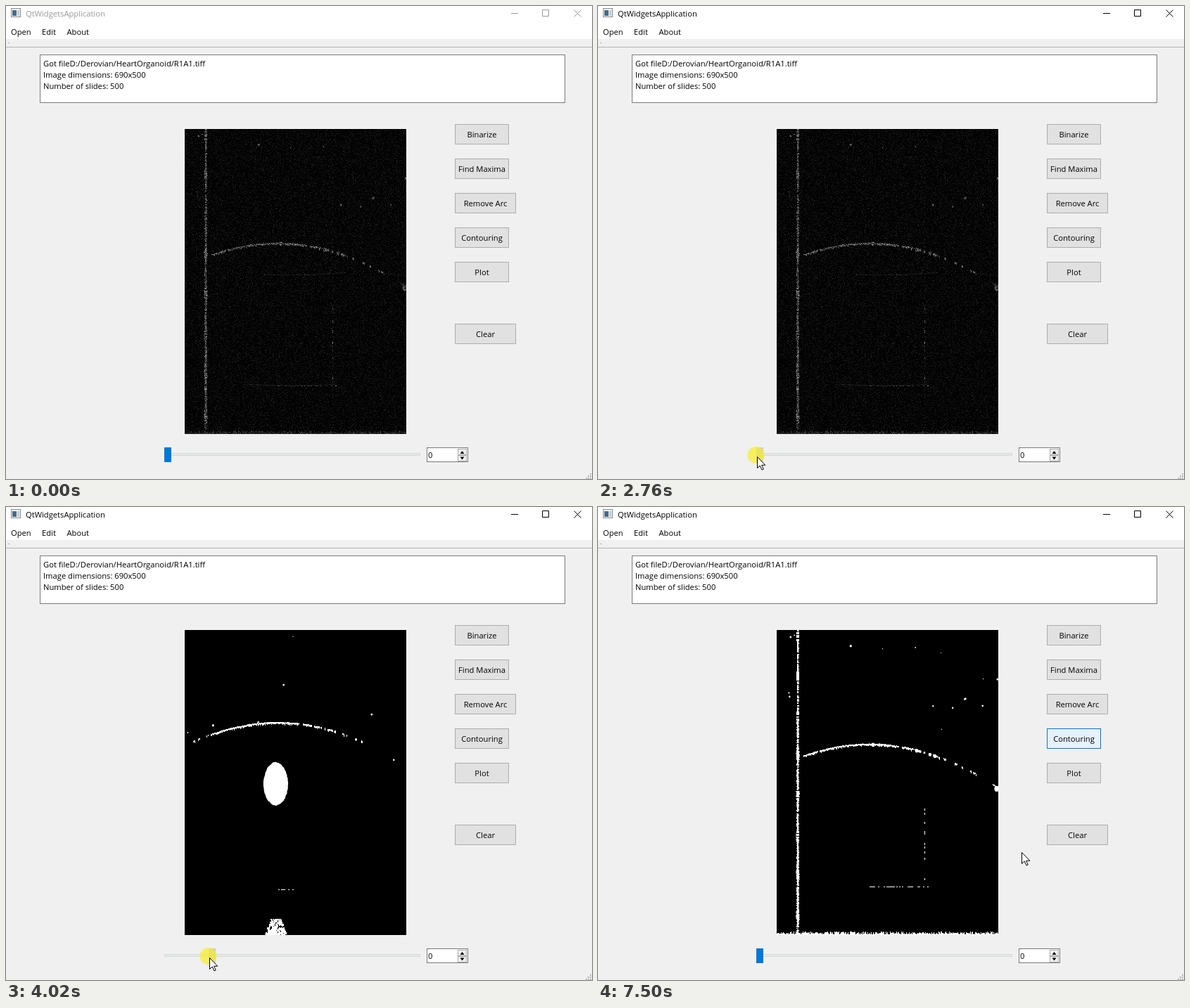
An HTML page with a canvas for the animation above (8000 ms loop, 833x673 px).

```html
<!DOCTYPE html>
<html lang="en">
<head>
<meta charset="utf-8">
<title>QtWidgetsApplication</title>
<style>
  html, body { margin: 0; width: 100%; height: 100%; overflow: hidden; background: #f0f0f0; }
  svg, canvas { position: absolute; left: 0; top: 0; }
  canvas { left: 254px; top: 175px; }
  text { font: 11.2px "Open Sans", "Noto Sans", sans-serif; white-space: pre; }
  rect { shape-rendering: crispEdges; }
  .button rect { fill: #e1e1e1; stroke: #adadad; }
  .button.hot rect { fill: #e5f1fb; stroke: #0078d7; }
  .button text { text-anchor: middle; }
</style>
</head>
<body>
<svg id="ui" width="833" height="673">
  <rect width="833" height="47" fill="#fff"/>
  <rect y="58" width="833" height="1" fill="#b4b4b4"/>
  <rect x="3" y="52" width="2" height="1" fill="#a0a0a0"/>
  <rect x="7.5" y="3.5" width="13" height="12" fill="#f4f4f4" stroke="#858b90"/>
  <rect x="9" y="6" width="6" height="8" fill="#456c8c"/>
  <rect x="16" y="6" width="3" height="8" fill="#c4cbd0"/>
  <g id="titlebar">
    <text x="28" y="15">QtWidgetsApplication</text>
    <path d="M718 10.5h10M762.5 5.5h9v9h-9zM807.5 5.5l10 10m0-10l-10 10" fill="none" stroke="currentColor"/>
  </g>
  <text x="7" y="41">Open</text><text x="51" y="41">Edit</text><text x="86.5" y="41">About</text>
  <rect x="48.5" y="69.5" width="746" height="68" fill="#fff" stroke="#7a7a7a"/>
  <text x="53" y="86">Got fileD:/Derovian/HeartOrganoid/R1A1.tiff</text>
  <text x="53" y="102">Image dimensions: 690x500</text>
  <text x="53" y="118">Number of slides: 500</text>
  <rect x="225.5" y="636.5" width="363" height="3" fill="#e7eaea" stroke="#d6d6d6"/>
  <rect x="598.5" y="628.5" width="58" height="20" fill="#fff" stroke="#7a7a7a"/>
  <text x="600" y="643">0</text>
  <rect x="642.5" y="630.5" width="12" height="8" fill="#f0f0f0" stroke="#acacac"/>
  <rect x="642.5" y="639.5" width="12" height="8" fill="#f0f0f0" stroke="#acacac"/>
  <path d="M645.5 637h6l-3-4zM645.5 641.5h6l-3 4z"/>
  <path d="M830 666h2M827 669h5M824 672h8" stroke="#b8b8b8" stroke-width="2" stroke-dasharray="2 1"/>
</svg>
<canvas id="view" width="315" height="434"></canvas>
<svg width="833" height="673">
  <rect id="handle" y="628" width="10" height="21"/>
  <circle id="press" r="12" fill="#f8ee28" fill-opacity=".7"/>
  <path id="cursor" d="M.5.5v16l3.7-3.5 2.8 6 2.3-1-2.7-5.7h5.2z" fill="#fff" stroke="#000"/>
</svg>
<script>
const LOOP = 8000, STEP = 69.84, ZERO_X = 225;
const LEFT = 254, TOP = 175, WIDTH = 315, HEIGHT = 434, RIGHT = LEFT + WIDTH, BOTTOM = TOP + HEIGHT;
const $ = id => document.getElementById(id);
const clamp = (v, lo, hi) => Math.min(hi, Math.max(lo, v));

const buttons = ['Binarize', 'Find Maxima', 'Remove Arc', 'Contouring', 'Plot', 'Clear'].map((label, i) => {
  const y = label === 'Clear' ? 452 : 168 + 49 * i;
  const w = label === 'Clear' || label === 'Remove Arc' ? 87 : 77;
  $('ui').insertAdjacentHTML('beforeend', `<g class="button">
    <rect x="638.5" y="${y + .5}" width="${w - 1}" height="28"/>
    <text x="${638 + w / 2}" y="${y + 19}">${label}</text></g>`);
  return { label, y, w, node: $('ui').lastElementChild };
});

// Pointer path: time, x, y
const path = [
  [670, 181, 656], [1440, 628, 202], [1650, 690, 180], [2136, 255, 651],
  [2490, 226, 641], [2900, 226, 641], [3184, 245, 641], [3673, 306, 641],
  [4022, 289, 641], [4640, 184, 641], [5070, 611, 320], [5420, 664, 331],
  [6070, 664, 331], [6560, 566, 440], [6970, 583, 495], [7499, 583, 495], [7500, 602, 491]
];

function pointerAt(t) {
  if (t < 670) return [512, 653];
  const i = path.findIndex(p => p[0] > t);
  if (i < 0) return path[path.length - 1].slice(1);
  const [t0, x0, y0] = path[i - 1], [t1, x1, y1] = path[i];
  const k = (t - t0) / (t1 - t0);
  return [x0 + (x1 - x0) * k, y0 + (y1 - y0) * k];
}

const g = $('view').getContext('2d', { willReadFrequently: true });
g.translate(-LEFT, -TOP);

function generator(seed) {
  return () => {
    seed = seed + 0x6D2B79F5 | 0;
    let n = Math.imul(seed ^ seed >>> 15, 1 | seed);
    n = n + Math.imul(n ^ n >>> 7, 61 | n) ^ n;
    return ((n ^ n >>> 14) >>> 0) / 4294967296;
  };
}

function box(x, y, w, h) {
  g.fillRect(Math.round(x), Math.round(y), Math.max(1, Math.round(w)), Math.max(1, Math.round(h)));
}

function dot(x, y, r) {
  g.beginPath();
  g.ellipse(x, y, r, r * 1.15, 0, 0, 7);
  g.fill();
}

// Thresholded slice; depth is the handle's offset in pixels
function drawSlice(depth) {
  const rnd = generator(depth + 7);
  g.fillStyle = '#000';
  g.fillRect(LEFT, TOP, WIDTH, HEIGHT);
  g.fillStyle = '#fff';
  drawArc(depth, rnd);

  // Lower reflection, shrinking with depth
  const half = Math.max(9, 42 - .5 * depth), middle = 428 - .48 * depth;
  for (let x = middle - half; x < middle + half; x += 2)
    if (rnd() < .55) box(x, 540 + .06 * depth, 2, 1);

  if (depth < 6) drawColumns(rnd);

  const edge = clamp(1 - depth / 45, 0, 1);
  if (edge) for (let x = LEFT; x < RIGHT; x++) {
    const h = (1 + rnd() * 4) * edge;
    box(x, BOTTOM - h, 1, h + 1);
  }

  for (let i = 16 - depth / 6; i > 0; i--)
    dot(LEFT + rnd() * WIDTH, TOP + rnd() * 150, .6 + rnd());

  if (depth > 36) drawOrganoid(depth, rnd);
}

// Parabola that breaks into dashes and lumps toward the right
function drawArc(depth, rnd) {
  const apex = 338.3 - .62 * depth + .0021 * depth * depth;
  const heightAt = x => apex + .00187 * (x - 386) ** 2;
  const end = RIGHT - .25 * depth;
  let on = true;
  for (let x = 292 - .42 * depth; x < end; x++) {
    const y = heightAt(x), gap = x < 290 ? .5 : clamp((x - 410) / 110, .03, .75);
    if (rnd() < .4) on = rnd() > gap;
    if (on) box(x, y - 1 - rnd(), 1, 1.6 + rnd() * 2.2);
    if (rnd() < (depth < 40 ? .06 : .02)) dot(x, y, 1 + rnd() * 1.6);
  }
  dot(end - 2, heightAt(end), depth < 6 || depth > 70 ? 3.6 : 1.2);
}

function drawColumns(rnd) {
  for (let y = TOP; y < BOTTOM; y++) {
    const swell = Math.sin(y / 9) > .75 ? 1.4 : 0, lower = y > 300;
    if (rnd() < (lower ? .93 : .78)) {
      const w = 2 + swell + rnd() * (lower ? 2 : 1);
      box(284 - w / 2, y, w, 1);
    }
    if (y > 425 && y < 562 && rnd() < .06) box(464, y, 1, 3);
  }
}

function drawOrganoid(depth, rnd) {
  const rx = 27 - .56 * (80 - depth), ry = Math.max(2, 51 - 1.19 * (80 - depth));
  g.beginPath();
  for (let a = 0; a < 2 * Math.PI; a += .09) {
    const k = .97 + rnd() * .05;
    g.lineTo(383.5 + rx * k * Math.cos(a), 394 + ry * k * Math.sin(a));
  }
  g.fill();
  drawLump(clamp((depth - 66) / 14, 0, 1.1), rnd);

  // Scatter below the body, widest at the bottom
  if (depth < 50) return;
  const half = 16 + (depth - 64) * .75, height = 23 + (depth - 64) * 1.3;
  for (let i = 0; i < 190; i++) {
    const rise = rnd() ** 1.8;
    box(383 + (rnd() * 2 - 1) * half * (1 - rise * .55), BOTTOM - 2 - height * rise, 1.6, 1 + rnd() * 3);
  }
}

// Side growth: a ring above a mass that frays into drips
function drawLump(size, rnd) {
  if (!size) return;
  g.save();
  g.translate(405, 372);
  g.scale(size, size);
  g.strokeStyle = '#fff';
  g.lineWidth = 4;
  g.beginPath();
  g.ellipse(28, -13, 5.5, 9, 0, 0, 7);
  g.stroke();
  for (let i = 0; i < 90; i++) box(rnd() * 32, -10 + rnd() * 28, 3 + rnd() * 3, 3 + rnd() * 4);
  for (let i = 0; i < 45; i++) box(3 + Math.sqrt(rnd()) * 32, 16 + rnd() ** 1.6 * 42, 2, 2 + rnd() * 4);
  g.restore();
}

// Unprocessed first slice: dim, noisy version with faint extra reflections
function drawRaw() {
  drawSlice(0);
  g.strokeStyle = '#606060';
  g.beginPath();
  g.moveTo(366, 382); g.quadraticCurveTo(425, 385, 484, 379);
  g.moveTo(338, 538); g.quadraticCurveTo(404, 543, 470, 538);
  g.stroke();
  g.strokeStyle = '#404040';
  g.setLineDash([3, 4, 1, 2]);
  g.beginPath();
  g.moveTo(464.5, 225); g.lineTo(464.5, 605);
  g.stroke();
  g.setLineDash([]);
  const image = g.getImageData(0, 0, WIDTH, HEIGHT), px = image.data, rnd = generator(3);
  for (let i = 0; i < px.length; i += 4) {
    const gain = i > WIDTH * 4 * (HEIGHT - 7) ? .25 : .55;
    px[i] = px[i + 1] = px[i + 2] = px[i] * gain * (.15 + rnd() ** 2) + rnd() ** 5 * 36;
  }
  g.putImageData(image, 0, 0);
}

let shown;
function showSlice(key) {
  if (key === shown) return;
  shown = key;
  key === 'raw' ? drawRaw() : drawSlice(key);
}

function place(node, x, y) {
  node.setAttribute('transform', `translate(${x} ${y})`);
}

function render(now) {
  const clock = now % LOOP;
  const t = clock >= 670 && clock < 6900
    ? 670 + Math.floor((clock - 665) / STEP) * STEP : clock;
  const [x, y] = pointerAt(t).map(Math.round);
  const dragging = t >= 2560 && t < 4640;
  const pressed = dragging || clock >= 5680 && clock < 5810;
  const handleX = dragging ? Math.max(ZERO_X, x - 1) : ZERO_X;

  showSlice(t < 2900 ? 'raw' : handleX - ZERO_X);
  const ink = t < 2560 ? '#999' : '#000';
  $('titlebar').style.color = $('titlebar').style.fill = ink;
  for (const b of buttons) {
    const over = t >= 670 && x >= 638 && x < 638 + b.w && y >= b.y && y < b.y + 29;
    b.node.classList.toggle('hot', over || b.label === 'Contouring' && t > 5600);
  }
  $('handle').setAttribute('x', handleX - .5);
  $('handle').style.fill = dragging ? '#ccc' : '#0078d7';
  $('press').style.display = pressed ? '' : 'none';
  $('cursor').style.display = t >= 670 || t >= 200 && t < 270 ? '' : 'none';
  place($('press'), x - 1.5, y - 2);
  place($('cursor'), x, y);
}

const start = performance.now();
function frame() {
  render(performance.now() - start);
  requestAnimationFrame(frame);
}
frame();
</script>
</body>
</html>
```
